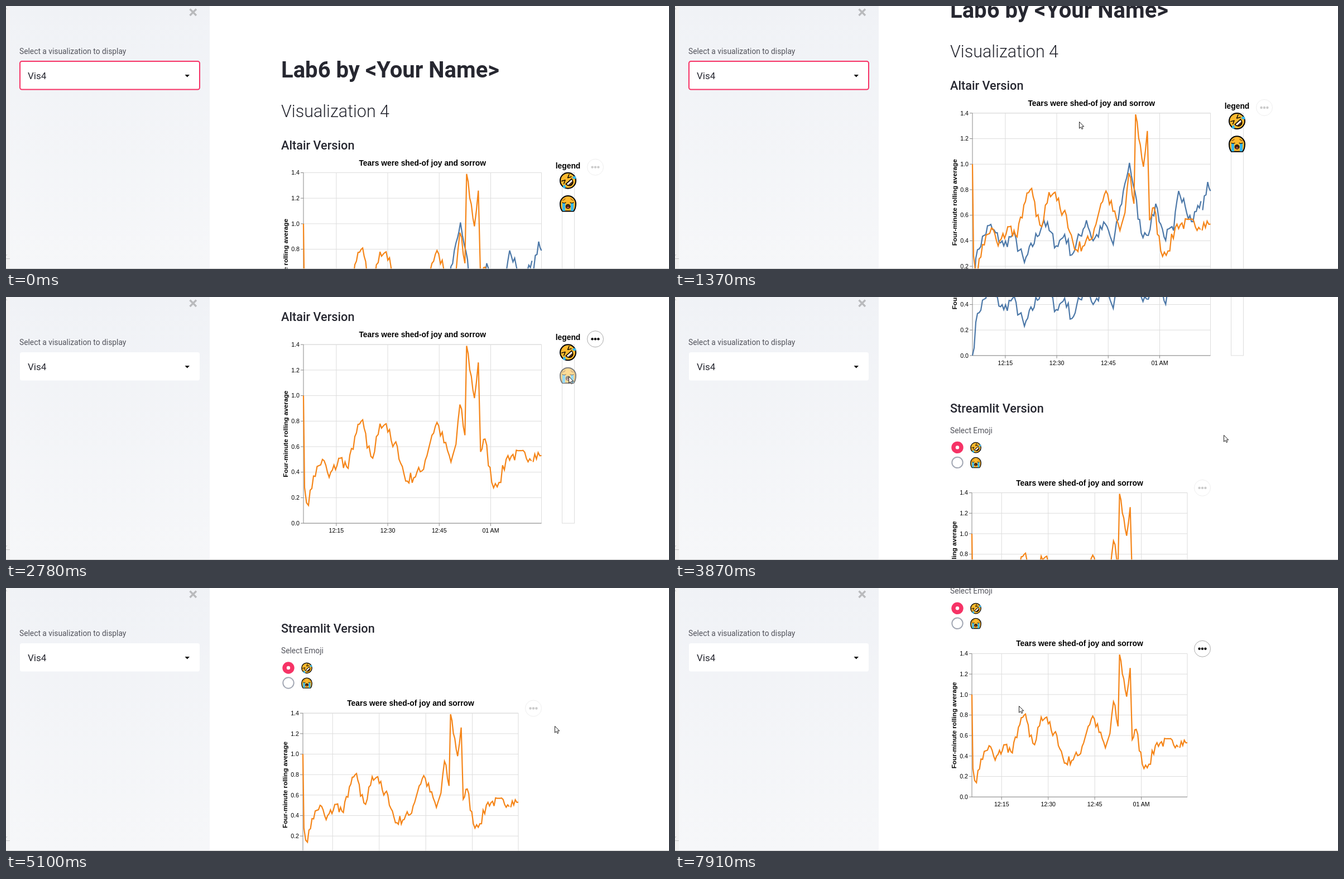
Animation, 1188 px wide and 471 px high, one loop 7.99 s. Source, as an HTML page:

```html
<!DOCTYPE html>
<html lang="en">
<head>
<meta charset="utf-8">
<title>Lab6</title>
<style>
html, body { margin: 0; height: 100%; overflow: hidden; background: #fff; }
svg { display: block; width: 1188px; height: 471px; font-family: Roboto, sans-serif; fill: #262730; }
.chart { font: 10.67px "Liberation Sans", Arial, sans-serif; fill: #000; }
.chart .title { font-size: 13.87px; font-weight: bold; text-anchor: middle; }
.chart .axis { font-size: 11.73px; font-weight: bold; text-anchor: middle; }
.grid { stroke: #ddd; fill: none; }
.ticks { stroke: #888; fill: none; }
.line { fill: none; stroke-width: 2.2; }
.label { font-size: 13.8px; fill: #53545c; }
.h3 { font-size: 21.7px; font-weight: 500; }
</style>
</head>
<body>
<svg viewBox="0 0 1188 471">
  <defs>
    <linearGradient id="side" x2="0" y2="1">
      <stop stop-color="#f0f2f6"/><stop offset="1" stop-color="#f6f7f9"/>
    </linearGradient>
    <g id="laugh" stroke-linecap="round" stroke-linejoin="round">
      <circle r="14" fill="#fdb92e" stroke="#000" stroke-width="2"/>
      <g transform="rotate(-42)" fill="none" stroke="#000" stroke-width="1.4">
        <path d="M-9-7l6 3-6 3M9-7l-6 3 6 3"/>
        <path d="M-7 2H7Q6 10 0 10T-7 2Z" fill="#4a2a14"/>
        <path d="M-6 3H6L5 6H-5Z" fill="#fff" stroke="none"/>
        <path d="M-9 1q-6-1-6 4 3 3 5 0ZM9 1q6-1 6 4-3 3-5 0Z" fill="#35b8ee" stroke="none"/>
      </g>
    </g>
    <g id="sob" stroke-linecap="round" stroke-linejoin="round">
      <path d="M-10 13.5Q-14 9-14 0A14 14 0 0 1 14 0Q14 9 10 13.5Z" fill="#fdb92e" stroke="#000" stroke-width="2"/>
      <path d="M-10-1h5v14h-5ZM10-1h-5v14h5Z" fill="#35b8ee"/>
      <path d="M-10-6q3 0 5-3M10-6q-3 0-5-3" fill="none" stroke="#9a5a12" stroke-width="1.2"/>
      <path d="M-10-2q3 2 6 0M10-2q-3 2-6 0" fill="none" stroke="#000" stroke-width="1.2"/>
      <circle cy="5" r="3.8" fill="#4a2a14" stroke="#000"/>
      <path d="M-2.5 7q2.5-2 5 0-2.500 2-5 0Z" fill="#e8555a"/>
    </g>
    <g id="more">
      <circle r="14.5" fill="#fff" stroke="#aaa"/>
      <g fill="#000"><circle cx="-5.4" r="2.2"/><circle r="2.2"/><circle cx="5.4" r="2.2"/></g>
    </g>
  </defs>

  <rect width="7" height="471" fill="#f2f1f1"/>
  <path d="M0 452.5H7" stroke="#c4c4c4"/>
  <path d="M0 4l2 2M0 447l2-2" stroke="#bbb"/>
  <rect x="7" width="358" height="471" fill="url(#side)"/>
  <path d="M329.5 5.5l11.5 11.5m0-11.5l-11.5 11.5" stroke="#b9babd" stroke-width="3.4"/>
  <text class="label" x="24" y="85.5">Select a visualization to display</text>
  <rect id="select" x="25" y="99" width="322" height="50.5" rx="3.5" fill="#fff" stroke-width="2"/>
  <text x="39" y="131" font-size="17">Vis4</text>
  <path d="M320.5 123h8.5l-4.25 4.6Z" fill="#111"/>

  <g id="page">
    <text x="493" y="127.5" font-size="40" font-weight="700">Lab6 by &lt;Your Name&gt;</text>
    <text x="493" y="199" font-size="30.5" font-weight="300">Visualization 4</text>
    <text class="h3" x="493" y="256.5">Altair Version</text>
    <g id="altair" class="chart"></g>
    <g class="chart">
      <text class="title" x="1007" y="290.5">legend</text>
      <rect class="grid" x="996.5" y="298.5" width="22" height="320"/>
      <use id="pick-laughs" href="#laugh" x="1007" y="312.7"/>
      <use id="pick-sobs" href="#sob" x="1007" y="354"/>
    </g>
    <use id="more-altair" href="#more" x="1056" y="288.6"/>

    <text class="h3" x="493" y="720.3">Streamlit Version</text>
    <text class="label" x="493" y="757.2">Select Emoji</text>
    <circle cx="506" cy="783" r="10.7" fill="#f63366"/>
    <circle cx="506" cy="783" r="3.2" fill="#fff"/>
    <circle cx="506" cy="810" r="9.7" fill="#fff" stroke="#a3a8b4" stroke-width="2"/>
    <use href="#laugh" transform="translate(539 783.3) scale(.66)"/>
    <use href="#sob" transform="translate(539 810.3) scale(.66)"/>
    <g id="streamlit" class="chart"></g>
    <use id="more-streamlit" href="#more" x="945" y="855.5"/>
  </g>

  <path d="M0 470.5H1188" stroke="#c8c8c8"/>
  <path id="cursor" d="M.5.5V12.2L3.2 9.7 5 13.5 6.9 12.7 5.2 8.9H8.8Z" fill="#fff" stroke="#222"/>
</svg>
<script>
const $ = id => document.getElementById(id);
const set = (id, name, value) => $(id).setAttribute(name, value);

// Turning points of each curve: [x of 426, value]
const laughs = [[0, 1], [2, .28], [9, .14], [18, .37], [34, .5], [46, .36], [66, .51], [80, .43],
  [92, .68], [106, .81], [114, .59], [124, .51], [137, .78], [148, .78], [160, .6], [168, .6],
  [183, .33], [212, .41], [230, .69], [239, .79], [264, .48], [273, .62], [280, .93], [289, .69],
  [292, 1.39], [306, .98], [313, 1.26], [317, .56], [325, .66], [337, .32], [350, .32], [366, .53], [426, .53]];
const sobs = [[0, 0], [9, .33], [30, .52], [56, .36], [72, .45], [93, .23], [128, .56], [150, .36],
  [165, .45], [178, .29], [204, .56], [216, .4], [238, .53], [252, .37], [273, .85], [281, 1.01],
  [288, .83], [302, .46], [318, .49], [328, .69], [343, .43], [360, .48], [369, .79], [378, .73],
  [392, .55], [409, .71], [412, .64], [421, .86], [426, .79]];

// Adds a seeded wobble about every three units between turning points
function wobble(keys) {
  let seed = 7;
  const random = () => (seed = seed * 16807 % 2147483647) / 2147483647;
  return keys.flatMap(([x, v], i) => {
    const [x2, v2] = keys[i + 1] || [x, v];
    const n = Math.max(1, Math.round((x2 - x) / 3));
    return Array.from({ length: n }, (_, k) =>
      [x + (x2 - x) * k / n, v + (v2 - v) * k / n + (k && (random() - .5) * .1)]);
  });
}

function chart(id, x, y, w, h, series) {
  const yAt = v => y + h * (1 - v / 1.4);
  let grid = `M${x} ${y}h${w}v${h}`, ticks = `M${x} ${y}v${h}h${w}`, text = '', lines = '';
  for (let i = 0; i < 8; i++) {
    const v = i / 5, ty = yAt(v);
    grid += `M${x} ${ty}h${w}`;
    ticks += `M${x} ${ty}h-5`;
    text += `<text x="${x - 7}" y="${ty + 3.7}" text-anchor="end">${v.toFixed(1)}</text>`;
  }
  ['12:15', '12:30', '12:45', '01 AM'].forEach((name, i) => {
    const tx = x + w * (.138 + .2162 * i);
    grid += `M${tx} ${y}v${h}`;
    ticks += `M${tx} ${y + h}v5`;
    text += `<text x="${tx}" y="${y + h + 16.7}" text-anchor="middle">${name}</text>`;
  });
  for (const [name, color, keys] of series) {
    let last = 999;
    const d = wobble(keys).map(([px, v]) => {
      const move = last > px || last < 410 && px >= 410; // pen up at the gap in the data
      last = px;
      return `${move ? 'M' : 'L'}${x + w * px / 426} ${yAt(v)}`;
    }).join('');
    lines += `<path id="${id}-${name}" class="line" stroke="${color}" d="${d}"/>`;
  }
  $(id).innerHTML = `<path class="grid" d="${grid}"/><path class="ticks" d="${ticks}"/>${lines}${text}
    <text class="title" x="${x + w / 2}" y="${y - 13}">Tears were shed-of joy and sorrow</text>
    <text class="axis" transform="translate(${x - 28} ${y + h / 2}) rotate(-90)">Four-minute rolling average</text>`;
}

const orange = ['laughs', '#f58518', laughs];
chart('altair', 533, 298.5, 426.5, 320, [['sobs', '#4c78a8', sobs], orange]);
chart('streamlit', 532, 864.2, 386, 256.7, [orange]);

// First step, last step, number of steps, then wheel notches, cursor goal or emoji picked
const acts = [
  [210, 910, 10, { to: [724, 207] }],
  [1220, 1370, 3, { wheel: 1 }],
  [1540, 1692, 3, { wheel: 1 }],
  [1768, 2300, 8, { to: [1012, 94] }],
  [2452, 2780, 5, { to: [1008, 142], pick: 'laughs' }],
  [3120, 3120, 1, { pick: 'sobs' }],
  [3480, 3557, 2, { to: [983, 247] }],
  [3635, 4100, 7, { wheel: 4 }],
  [4410, 4560, 3, { wheel: 1 }],
  [4950, 5100, 3, { wheel: -1 }],
  [5330, 5500, 3, { wheel: 1 }],
  [6280, 6440, 3, { to: [1107, 429] }],
  [6520, 6520, 1, { to: [1296, 555] }],
  [7830, 7910, 2, { to: [616, 211] }]];
const notch = 106.67;
const ease = p => 1 - (1 - p ** 1.27) ** 1.8;

function chartAt(x, y) {
  if (y > 271 && y < 640 && x < 1075) return 'altair';
  if (y > 833 && y < 1150 && x < 961) return 'streamlit';
}

function stateAt(t) {
  const s = { scroll: 0, x: 800, y: 485 };
  for (const [start, end, steps, { wheel, to, pick }] of acts) {
    if (t < start) break;
    const step = (end - start) / (steps - 1) || 1;
    const p = Math.min(1, (Math.floor((t - start) / step + 1e-6) + 1) / steps);
    if (wheel) s.scroll += wheel * notch * ease(p);
    if (pick) s.pick = pick;
    if (to) {
      s.x += (to[0] - s.x) * p;
      s.y += (to[1] - s.y) * p;
      s.over = chartAt(s.x, s.y + s.scroll);
    }
  }
  return s;
}

function draw(t) {
  const { scroll, x, y, pick, over } = stateAt(t);
  set('page', 'transform', `translate(0 ${-scroll})`);
  set('cursor', 'transform', `translate(${x} ${y})`);
  set('select', 'stroke', pick ? 'none' : '#f63366');
  for (const name of ['laughs', 'sobs']) {
    const on = !pick || pick === name;
    set('altair-' + name, 'opacity', on ? 1 : 0);
    set('pick-' + name, 'opacity', on ? 1 : .5);
  }
  for (const name of ['altair', 'streamlit']) set('more-' + name, 'opacity', over === name ? 1 : .2);
}

const begin = performance.now();
(function loop() {
  draw((performance.now() - begin) % 7990);
  requestAnimationFrame(loop);
})();
</script>
</body>
</html>
```
